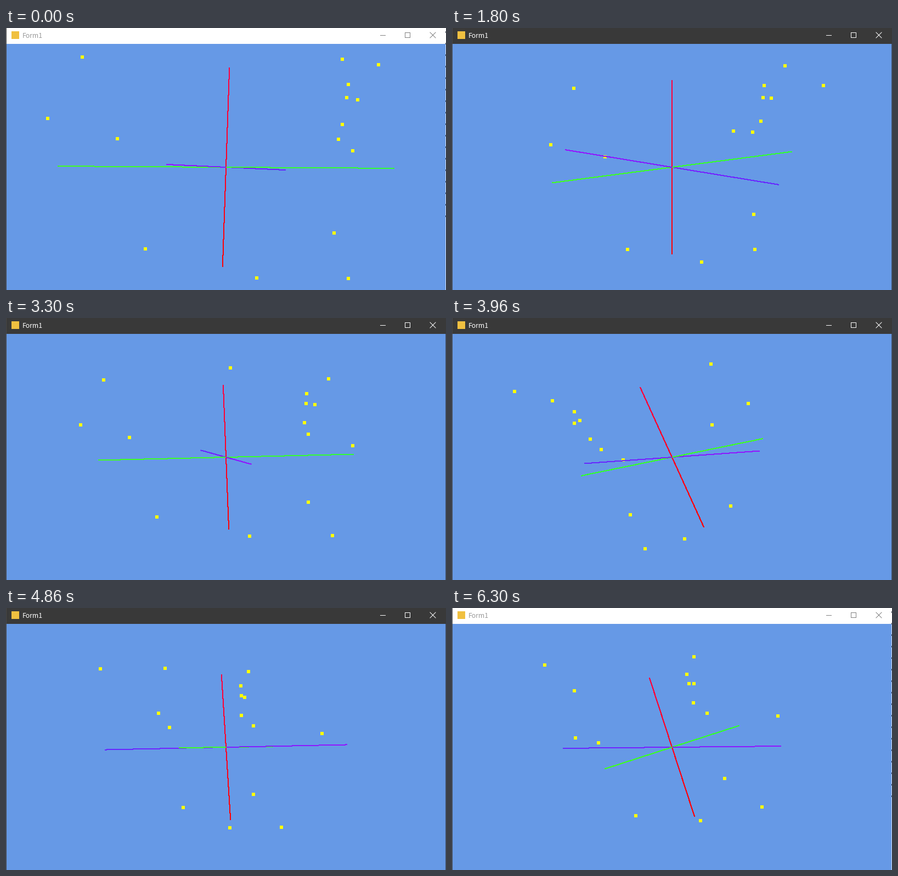
Write a matplotlib script that moves like this. It is 802 by 478 pixels and loops after 6.36 s.

```python
import numpy as np
import matplotlib.pyplot as plt
from matplotlib.animation import FuncAnimation
from matplotlib.collections import LineCollection
from matplotlib.colors import to_rgb
from matplotlib.patches import Rectangle

W, H, DPI = 802, 478, 64
STEP, LOOP = 60, 6360
CX, CY = 401, 254
HALF_W, HALF_H = 401, 224.5
PX = 72 / DPI  # points per pixel
BACK = "#6699e6"

# Each drag ends in a pose that is held: start, end, yaw, pitch, roll (degrees)
HOLDS = [
    (0, 360, -19.5, 1.3, 1.1),
    (900, 960, -43, -0.3, -1.9),
    (1140, 2160, -41.7, 15.1, 0),
    (2460, 2460, -74, 2, -1.5),
    (2700, 2820, -43.6, -11.1, 4.1),
    (3060, 3240, -20, -9, 2),
    (3540, 3960, 136.1, 6.6, -14.2),
    (4500, 4680, 85, 15.5, 0),
    (4860, 4860, 68.7, 0.3, -2),
    (5160, 5460, 78, -15, -3),
    (5700, LOOP, 58.4, -14.2, -10),
]
ZOOM_TIMES = (1800, 1860, 1980)  # wheel clicks

# Points sit in planes of equal depth: depth -> (height, side)
PLANES = {
    -0.107: [(0.44 + 0.134 * k, 0.645 + 0.01 * k) for k in (0, 2, 3)]
            + [(1.1, -0.916), (0.48, -1.109), (0.687, 0.733), (1.04, 0.85)],
    -0.177: [(0.286, -0.715), (-0.82, -0.527)],
    -0.078: [(-1.11, 0.177)],
    -0.047: [(-0.65, 0.64)],
    -0.02: [(0.288, 0.657)],
    0.109: [(-1.11, 0.789)],
    0.444: [(0.163, 0.909)],
    -1.107: [(1.115, 0.279)],
}
POINTS = np.array([(h, s, d) for d, spots in PLANES.items() for h, s in spots])

# colours at the negative and positive end of each axis
AXIS_COLORS = [("#ff0000", "#ff0040"), ("#40ff20", "#30ff30"),
               ("#6428ff", "#9614ff")]


def pose(t):
    """Yaw, pitch and roll at a time, moving evenly from hold to hold."""
    for (_, t0, *a), (t1, _, *b) in zip(HOLDS, HOLDS[1:]):
        if t < t1:
            k = max(0, t - t0) / (t1 - t0)
            return np.radians(np.array(a) * (1 - k) + np.array(b) * k)
    return np.radians(HOLDS[-1][2:])


def view(t):
    """Rows give the screen right, up and toward-viewer directions."""
    yaw, pitch, roll = pose(t)
    cy, sy, cr, sr = np.cos(yaw), np.sin(yaw), np.cos(roll), np.sin(roll)
    right = np.array([sr, cr * cy, cr * sy])
    up = np.array([cr, -sr * cy, -sr * sy])
    near = np.array([0, -sy, cy])
    c, s = np.cos(pitch), np.sin(pitch)
    return np.array([right, c * up + s * near, c * near - s * up])


def project(pts, rot, scale):
    x, y, z = rot @ np.transpose(pts)
    return CX + HALF_W * scale * x, CY - HALF_H * scale * y, z


fig = plt.figure(figsize=(W / DPI, H / DPI), dpi=DPI, facecolor=BACK)
ax = fig.add_axes([0, 0, 1, 1])
ax.set_xlim(0, W)
ax.set_ylim(H, 0)
ax.axis("off")


def box(x, y, w, h, color, z=20):
    return ax.add_patch(Rectangle((x, y), w, h, fc=color, lw=0,
                                  antialiased=False, zorder=z))


# window frame
bar = box(0, 0, W, 29, "#393939")
box(0, 0, 1, H, "#484848", 22)
edge = box(W - 1, 29, 1, H - 29, "#40506c", 22)
specks = [box(W - 1, y, 1, 3, "#3c4450", 23) for y in range(6, 345, 21)]
box(10, 6, 14, 14, "#f0c040", 21)
title = ax.text(30, 18, "Form1", family="Noto Sans CJK JP", size=12.3 * PX,
                va="baseline", zorder=21)
minimize = box(682, 13, 10, 1, "white", 21)
maximize = box(727, 8, 10, 10, "white", 21)
hollow = box(728, 9, 8, 8, "#393939", 22)
close = [ax.plot([773, 783], ys, lw=PX, zorder=21)[0]
         for ys in ((8, 18), (18, 8))]

# scene: dots and the two halves of each axis, sorted by depth when drawn
dots = [box(0, 0, 6, 6, "#ffff00", 10) for _ in POINTS]
PARTS = 8
halves = []
for axis, ends in zip(np.eye(3), AXIS_COLORS):
    lo, hi = (np.array(to_rgb(c)) for c in ends)
    for sign in (-1, 1):
        mid = (np.arange(PARTS) + 0.5) / PARTS * sign
        colors = lo + (hi - lo) * ((mid + 1) / 2)[:, None]
        # without smoothing every touched pixel fills, so 1 px gives 2 px
        line = LineCollection([], colors=colors, linewidths=PX,
                              antialiaseds=False)
        line.set_snap(False)
        ax.add_collection(line, autolim=False)
        halves.append((line, axis * sign))


def set_active(active):
    back = "#393939" if active else "white"
    ink = "white" if active else "#808080"
    bar.set_facecolor(back)
    hollow.set_facecolor(back)
    edge.set_facecolor("#40506c" if active else "#c8d8f0")
    title.set_color("white" if active else "#999999")
    minimize.set_facecolor(ink)
    maximize.set_facecolor(ink)
    for c in close:
        c.set_color(ink)
    for s in specks:
        s.set_visible(not active)


def draw(i):
    t = i * STEP
    set_active(420 <= t < 6300)
    rot = view(t)
    scale = 0.9 ** (2 + sum(t >= z for z in ZOOM_TIMES))

    for dot, x, y, z in zip(dots, *project(POINTS, rot, scale)):
        dot.set_xy((round(x) - 3, round(y) - 3))
        dot.set_zorder(10 + z)

    for line, tip in halves:
        stops = np.linspace(0, 1, PARTS + 1)[:, None] * tip
        x, y, z = project(stops, rot, scale)
        xy = np.column_stack([x, y])
        line.set_segments(np.stack([xy[:-1], xy[1:]], axis=1))
        line.set_zorder(10 + z.mean())
    return []


anim = FuncAnimation(fig, draw, frames=LOOP // STEP, interval=STEP,
                     repeat=True, repeat_delay=0, init_func=lambda: draw(0))
plt.show()
```
